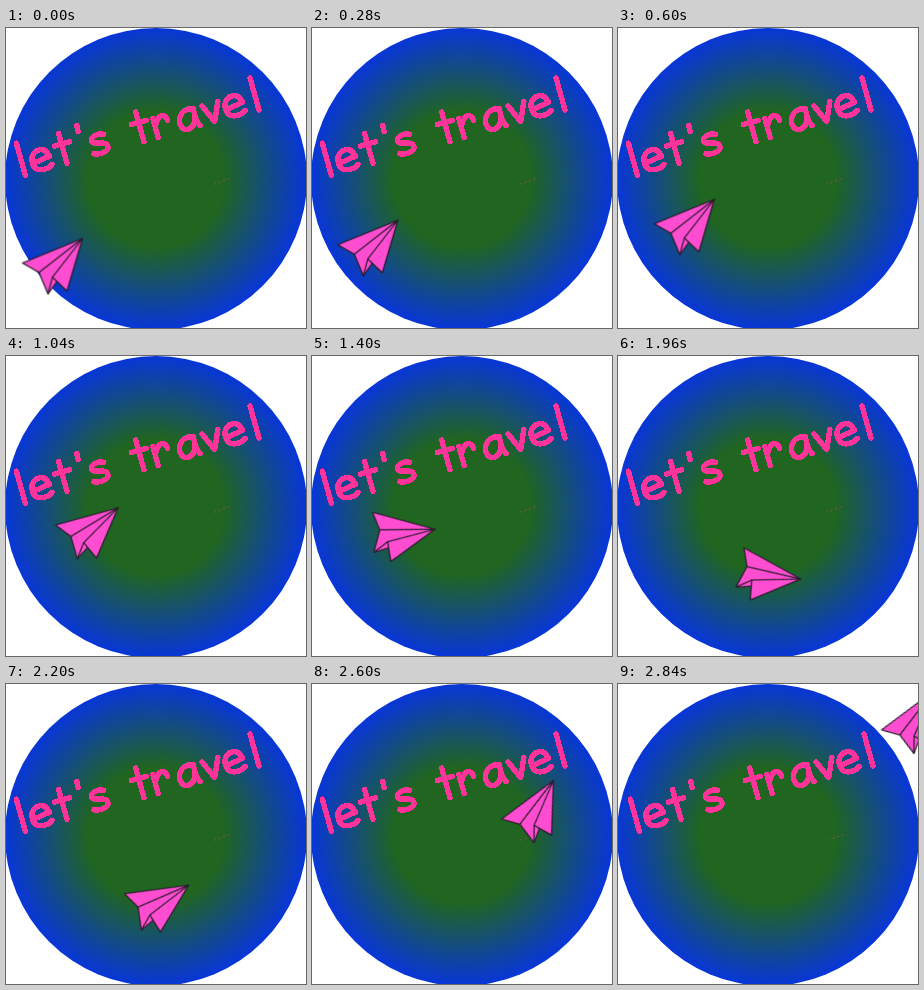
An HTML page for the animation above (2.88 s loop, 300 by 300 pixels).

```html
<!DOCTYPE html>
<html lang="en">
<head>
<meta charset="utf-8">
<title>let's travel</title>
<style>
  html, body { margin: 0; width: 100%; height: 100%; overflow: hidden; background: #fff; }
  svg { display: block; width: 100vw; height: 100vh; }

  .plane {
    fill: #ff4dd2;
    stroke: #261a28;
    stroke-width: 1.2;
    stroke-linejoin: round;
    animation: fly 2880ms infinite;
  }
  .sign { animation: nudge 2880ms step-end infinite; }
  .lettering {
    fill: none;
    stroke: #ff3399;
    stroke-width: 5.4;
    stroke-linecap: round;
    stroke-linejoin: round;
    shape-rendering: crispEdges;
  }
  .caption { font: 46px "Open Sans", sans-serif; fill: none; }
  .trail { stroke: #855450; stroke-width: 1; stroke-dasharray: 2.2 2.6; }

  /* Glide, turn, glide, turn back, leave: one step every 40 ms */
  @keyframes fly {
    0%       { transform: translate(46.5px, 238.5px) rotate(0deg); animation-timing-function: steps(24); }
    33.3333% { transform: translate(78.3px, 175.8px) rotate(0deg); animation-timing-function: steps(15); }
    54.1666% { transform: translate(83.6px, 177.8px) rotate(51deg); animation-timing-function: steps(11); }
    69.4444% { transform: translate(148px, 221.3px) rotate(51deg); animation-timing-function: steps(9); }
    81.9444% { transform: translate(145.5px, 220.2px) rotate(-14.5deg); animation-timing-function: steps(12); }
    98.6111%, 100% { transform: translate(293.4px, 41.8px) rotate(-14.5deg); }
  }
  @keyframes nudge {
    0% { transform: none; }
    98.6111%, 100% { transform: translate(2px, 0); }
  }
</style>
</head>
<body>
<svg viewBox="0 0 300 300">
  <defs>
    <radialGradient id="globe">
      <stop offset=".45" stop-color="#206520"/>
      <stop offset="1" stop-color="#0836d8"/>
    </radialGradient>
    <path id="l" d="M6.7-34.5V-1.2"/>
    <path id="e" d="M18-10.5L35-13C34-19 31-22 26.5-22C20.5-22 16.8-17 16.8-11C16.8-5 20.5-1.8 27-1.8C31-1.8 33.5-2.8 35.3-4.5"/>
    <path id="t" d="M50-32.5V-1.5M42.5-21.5H58"/>
  </defs>

  <circle cx="150" cy="151" r="151" fill="url(#globe)"/>

  <g class="sign">
    <g transform="translate(13.2 150.2) rotate(-15.6)">
      <text class="caption">let's travel</text>
      <g class="lettering">
        <use href="#l"/>
        <use href="#e"/>
        <use href="#t"/>
        <path d="M69.7-35.5L69.2-29"/>
        <path d="M93-19.5C88-23 80-20.5 79.5-16.5C79-11.5 94-13.5 94-7C94-1.5 84-.5 78.5-3.5"/>
        <use href="#t" x="80"/>
        <path d="M144.8-21.5V-2M144.8-12C147-18.5 151-22.5 155-21.7C157.5-21 158.3-18.5 158.3-16"/>
        <path d="M186-20C176-24 169.5-16 169.5-9.5C169.5-4.5 172-1.8 176-1.8C181-1.8 184.5-6 186-13M186.5-20.5C185.5-13 186-6 188.5-2"/>
        <path d="M195.5-20.5L203.5-2L212-20.5"/>
        <use href="#e" x="200.5"/>
        <use href="#l" x="242.6"/>
      </g>
    </g>
    <path class="trail" d="M208 156.3L225 150"/>
  </g>

  <g class="plane">
    <path d="M-30-3.5L30-28L14.5 24.5L4.4 15L-4.5 27.5L-13.5 6Z"/>
    <path fill="none" d="M-13.5 6L30-28L0 10.6L4.4 15M0 10.6L-4.5 27.5"/>
  </g>
</svg>
</body>
</html>
```
